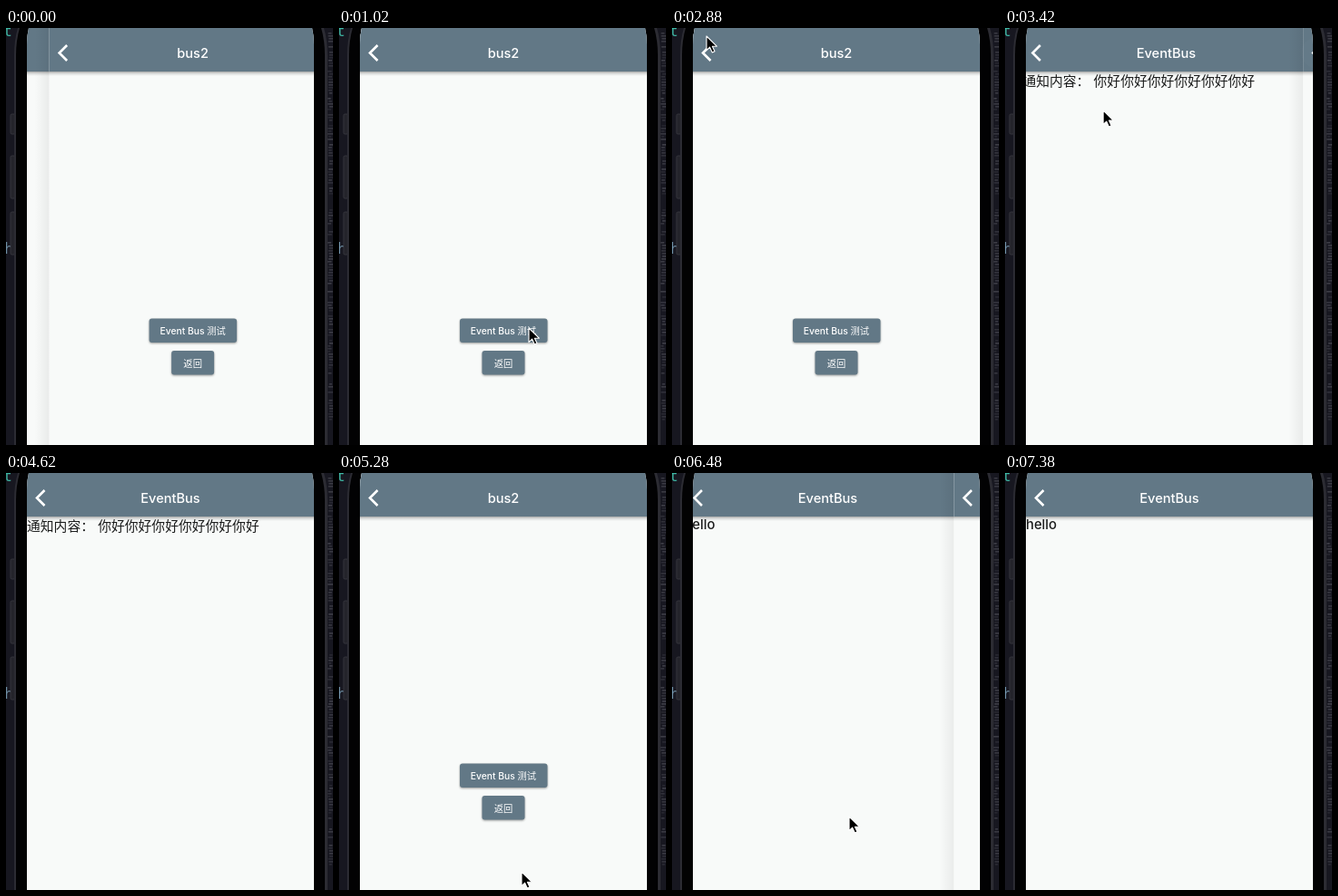
An HTML page for the animation above (7440 ms loop, 360 px wide and 460 px high).

```html
<!DOCTYPE html>
<html lang="zh-CN">
<head>
<meta charset="utf-8">
<title>Event bus demo</title>
<style>
  html, body { margin: 0; width: 100%; height: 100%; overflow: hidden; background: #171720; }
  svg { display: block; width: 360px; height: 460px; }
  text { font-family: Inter, "Noto Sans CJK SC", "Noto Sans CJK", sans-serif; }
  .title { font-size: 14.6px; font-weight: 500; fill: #fff; text-anchor: middle; }
  .label { font-size: 10.3px; font-weight: 500; fill: #fff; text-anchor: middle; }
  .msg { font-size: 14.8px; fill: #1b1c1c; }
  .hello { font-weight: 500; }
  .code { font-family: "Noto Sans Mono", monospace; font-size: 16px; }
  .btn { filter: drop-shadow(0 1px 1px rgba(0, 0, 0, .38)); }
</style>
</head>
<body>
<svg viewBox="0 0 360 460">
  <defs>
    <path id="glass" d="M25 0Q23 8 23 18V460H339V18Q339 8 337 0Z"/>
    <clipPath id="screen"><use href="#glass"/></clipPath>
    <clipPath id="sendClip"><rect x="133" y="320.5" width="96.5" height="26.5" rx="3"/></clipPath>
    <clipPath id="backClip"><rect x="157.5" y="356" width="47" height="26.5" rx="3"/></clipPath>
    <linearGradient id="barShade" x2="0" y2="1">
      <stop stop-color="#000" stop-opacity=".34"/>
      <stop offset=".4" stop-color="#000" stop-opacity=".13"/>
      <stop offset="1" stop-color="#000" stop-opacity="0"/>
    </linearGradient>
    <linearGradient id="edgeShade">
      <stop stop-color="#000" stop-opacity="0"/>
      <stop offset=".5" stop-color="#000" stop-opacity=".03"/>
      <stop offset="1" stop-color="#000" stop-opacity=".06"/>
    </linearGradient>
    <g id="page">
      <rect x="23" width="316" height="460" fill="#f8faf9"/>
      <rect x="23" y="48" width="316" height="5" fill="url(#barShade)"/>
      <rect x="23" width="316" height="48" fill="#627886"/>
      <path d="M42.5 19L34 27.5L42.5 36" fill="none" stroke="#fff" stroke-width="2.6"/>
    </g>
  </defs>

  <rect width="360" height="460" fill="#171720"/>
  <g id="editor"></g>
  <text class="code" x="-3" y="9" fill="#3fb8a5">t</text>
  <text class="code" x="-1.5" y="249" fill="#6f8fa5">h</text>

  <g fill="#24242b" stroke="#3b3b43" stroke-width=".8">
    <rect x="5" y="95" width="7" height="22" rx="1.5"/>
    <rect x="5" y="141" width="7" height="47" rx="1.5"/>
    <rect x="5" y="203" width="7" height="47" rx="1.5"/>
  </g>
  <path d="M13 0Q9 14 9 30V460H354V30Q354 14 350 0Z" fill="#2c2c33"/>
  <path d="M15 0Q11 14 11 30V460H351V30Q351 14 347 0Z" fill="#020203"/>

  <g clip-path="url(#screen)">
    <g id="home">
      <use href="#page"/>
      <text class="title" x="181" y="32.5">EventBus</text>
      <text class="msg hello" id="hello" x="23" y="62">hello</text>
      <text class="msg" id="notice" x="23" y="63.5"></text>
    </g>
    <g id="detail">
      <rect id="edge" x="7" width="16" height="460" fill="url(#edgeShade)"/>
      <use href="#page"/>
      <circle id="tap" cx="38" cy="27.5" r="17" fill="#fff" opacity="0"/>
      <text class="title" x="181" y="32.5">bus2</text>
      <g class="btn" id="send">
        <rect x="133" y="320.5" width="96.5" height="26.5" rx="3" fill="#627886"/>
        <g clip-path="url(#sendClip)" fill="#fff">
          <rect class="glow" x="133" y="320" width="97" height="28" opacity="0"/>
          <circle class="wave" cx="209" cy="331" r="0" opacity="0"/>
        </g>
        <text class="label" x="181" y="338">Event Bus 测试</text>
      </g>
      <g class="btn" id="back">
        <rect x="157.5" y="356" width="47" height="26.5" rx="3" fill="#627886"/>
        <g clip-path="url(#backClip)" fill="#fff">
          <rect class="glow" x="157" y="356" width="48" height="27" opacity="0"/>
          <circle class="wave" cx="195" cy="379" r="0" opacity="0"/>
        </g>
        <text class="label" x="181" y="373.5">返回</text>
      </g>
    </g>
  </g>

  <path id="cursor" d="M0 0V15.6L3.6 12.2L6.3 18L9 16.8L6.4 11.2H11.3Z" fill="#000" stroke="#fff" stroke-width="1.1" stroke-linejoin="round"/>
</svg>
<script>
const LOOP = 7440, STEP = 60, SLIDE = 500, WIDTH = 316;
const $ = id => document.getElementById(id);
const clamp = v => Math.min(1, Math.max(0, v));
const smooth = v => v * v * (3 - 2 * v);

// Page changes: start time and whether the second page opens or closes
const moves = [[-252, true], [3100, false], [4680, true], [6240, false]];
// Pointer path: time, x, y
const path = [
  [0, 222, 480], [360, 222, 480], [540, 218, 413], [840, 209, 331],
  [2520, 209, 331], [2880, 38, 9], [3000, 37, 22], [3180, 37, 22],
  [3540, 133, 115], [3720, 133, 115], [3780, 193, 297], [3840, 200, 480],
  [5160, 205, 480], [5400, 197, 400], [5640, 195, 379],
  [6600, 195, 379], [6900, 200, 480], [LOOP, 200, 480]
];
const presses = { send: [1080, 2020], back: [6060] };
$('notice').textContent = '通知内容： ' + '你好'.repeat(6);

// Cubic bezier (.35, .91, .33, .97): quick start, slow finish
function ease(v) {
  if (v <= 0 || v >= 1) return clamp(v);
  const at = (a, b, s) => 3 * a * s * (1 - s) ** 2 + 3 * b * s * s * (1 - s) + s ** 3;
  let lo = 0, hi = 1;
  for (let i = 0; i < 20; i++) {
    const mid = (lo + hi) / 2;
    if (at(.35, .33, mid) < v) lo = mid; else hi = mid;
  }
  return at(.91, .97, lo);
}

function pointer(t) {
  const i = path.findIndex((p, n) => n && p[0] > t);
  const a = path[i - 1], b = path[i];
  const k = smooth((t - a[0]) / (b[0] - a[0]));
  return [a[1] + (b[1] - a[1]) * k, a[2] + (b[2] - a[2]) * k];
}

const glow = (t, start) => clamp((t - start) / 100) * clamp((start + 420 - t) / 200);

function drawButton(id, t) {
  const start = presses[id].filter(s => s <= t).pop() ?? -1e4;
  const level = glow(t, start);
  const el = $(id);
  el.querySelector('.glow').setAttribute('opacity', .17 * level);
  const wave = el.querySelector('.wave');
  wave.setAttribute('r', 90 * clamp((t - start) / 700));
  wave.setAttribute('opacity', .07 * level);
  el.style.filter = `drop-shadow(0 ${1 + level}px ${1 + level}px rgba(0,0,0,.38))`;
}

function draw(t) {
  const [start, open] = moves.filter(m => m[0] <= t).pop();
  const k = ease((t - start) / SLIDE);
  const off = open ? 1 - k : k;
  $('detail').setAttribute('transform', `translate(${WIDTH * off} 0)`);
  $('detail').style.display = off < 1 ? '' : 'none';
  $('edge').setAttribute('opacity', off > 0 ? 1 : 0);
  $('home').setAttribute('transform', `translate(${-WIDTH / 3 * (1 - off)} 0)`);
  const noticed = t >= 2080 && t < 6240;
  $('notice').style.display = noticed ? '' : 'none';
  $('hello').style.display = noticed ? 'none' : '';
  $('tap').setAttribute('opacity', .15 * glow(t, 3020));
  drawButton('send', t);
  drawButton('back', t);
  $('cursor').setAttribute('transform', `translate(${pointer(t)})`);
}

// Dim rows of far-off code beside the phone
let seed = 7;
const rand = () => (seed = seed * 16807 % 2147483647) / 2147483647;
let rows = '';
for (let y = 2; y < 434; y += 3) {
  if (rand() < .2) continue;
  const x = 354 + rand() * 2, w = 3 + rand() * 4;
  rows += `<rect x="${x}" y="${y}" width="${w}" height="1.6" fill="#5a5a63" opacity="${.2 + rand() * .4}"/>`;
}
$('editor').innerHTML = rows;

function tick() {
  const t = performance.now() % LOOP;
  draw(Math.floor(t / STEP) * STEP);
  requestAnimationFrame(tick);
}
tick();
</script>
</body>
</html>
```
